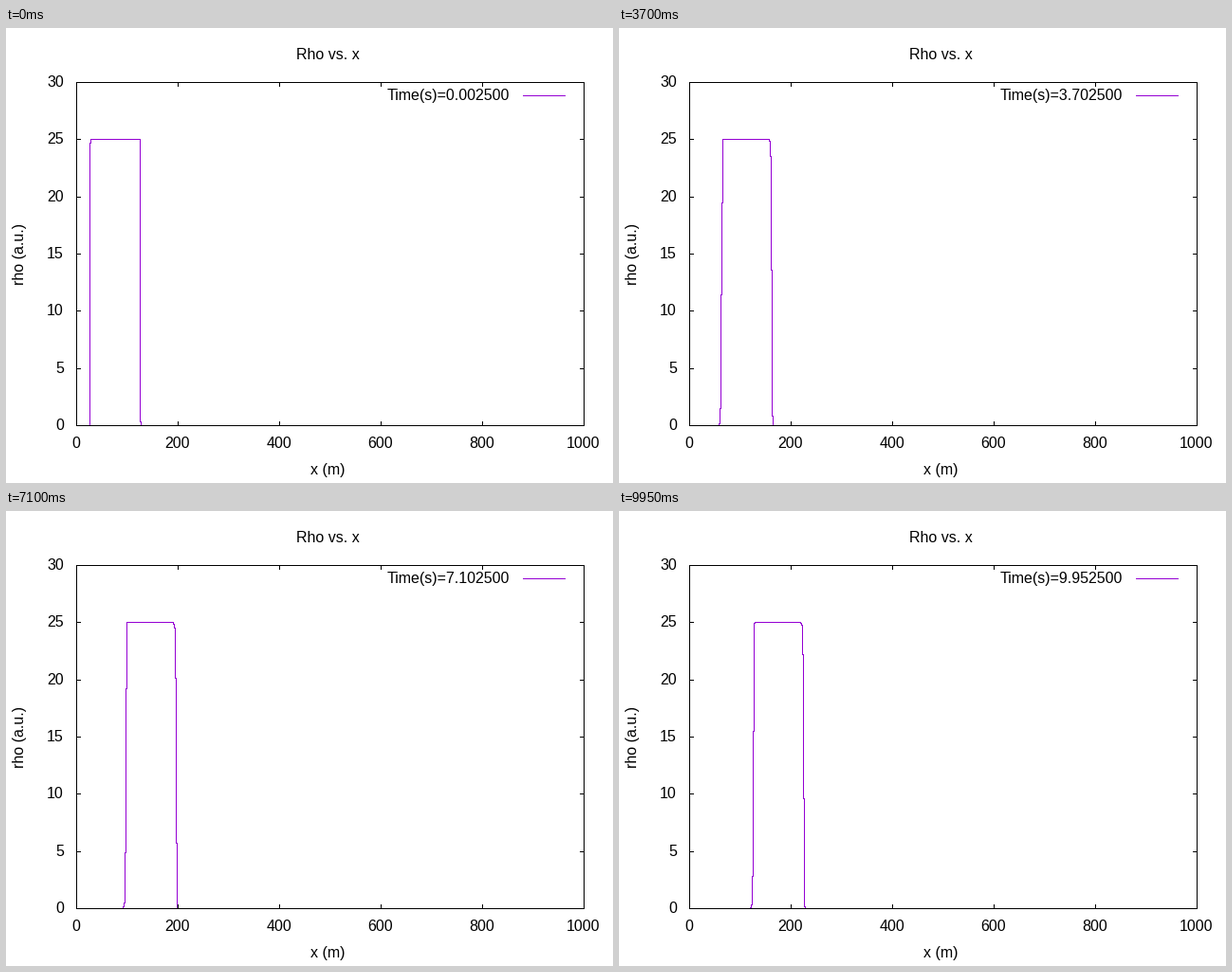
A matplotlib script that plays this animation: 640x480 px, repeating every 10000 ms.

```python
import numpy as np
import matplotlib.pyplot as plt
from matplotlib.animation import FuncAnimation
from matplotlib.collections import LineCollection

WIDTH, HEIGHT, DPI = 640, 480, 80
LEFT, RIGHT, TOP, BOTTOM = 74, 609, 57, 419
X_ORIGIN = LEFT - 0.26  # the x axis starts at a fractional pixel
X_MAX, Y_MAX = 1000, 30
PURPLE = "#9400d3"
FRAMES, INTERVAL = 200, 50
DT, SPEED, STEPS_PER_FRAME = 0.0025, 10, 20
COURANT = SPEED * DT  # cells are 1 m wide

plt.rcParams["font.family"] = "Liberation Sans"
plt.rcParams["font.size"] = 16 * 72 / DPI


def px(x):
    return np.floor(X_ORIGIN + np.asarray(x) * (RIGHT - LEFT) / X_MAX + 0.5)


def py(y):
    return np.floor(BOTTOM - np.asarray(y) * (BOTTOM - TOP) / Y_MAX + 0.5)


def superbee(a, b):
    p, q = np.abs(a), np.abs(b)
    size = np.maximum(np.minimum(2 * p, q), np.minimum(p, 2 * q))
    return np.where(a * b > 0, np.sign(a) * size, 0)


def advect(rho):
    """Advance the density by one step of flux-limited upwind advection."""
    d = np.diff(rho)
    flux = rho[1:-1] + 0.5 * (1 - COURANT) * superbee(d[:-1], d[1:])
    new = rho.copy()
    new[2:-1] -= COURANT * np.diff(flux)
    return new


def simulate():
    rho = np.where((grid > 26) & (grid < 126), 25.0, 0.0)
    rho = advect(rho)
    states = [rho]
    for _ in range(FRAMES - 1):
        for _ in range(STEPS_PER_FRAME):
            rho = advect(rho)
        states.append(rho)
    return states


def pixel_lines(color, zorder):
    lines = LineCollection([], colors=color, linewidths=72 / DPI,
                           antialiaseds=False, capstyle="projecting",
                           snap=False, zorder=zorder)
    ax.add_collection(lines, autolim=False)
    return lines


def set_lines(lines, segments):
    shape = np.array(segments, dtype=float).reshape(-1, 2, 2)
    lines.set_segments(list(shape + 0.5))  # pixel centres


def curve_segments(rho):
    """Turn the curve into upright and level runs of whole pixels."""
    runs = []
    ys = py(rho)
    for x0, y0, x1, y1 in zip(grid_px[:-1], ys[:-1], grid_px[1:], ys[1:]):
        if y0 == y1:
            if x0 != x1 and y0 < BOTTOM:
                runs.append([(x0, y0), (x1, y1)])
        elif x0 == x1:
            runs.append([(x0, y0), (x0, y1)])
        else:
            mid = (y0 + y1) // 2
            runs += [[(x0, y0), (x0, mid)], [(x1, mid), (x1, y1)]]
    return runs


def draw_axes():
    corners = [(LEFT, TOP), (RIGHT, TOP), (RIGHT, BOTTOM), (LEFT, BOTTOM)]
    segments = [[a, b] for a, b in zip(corners, corners[1:] + corners[:1])]
    for value in range(0, X_MAX + 1, 200):
        x = px(value)
        segments += [[(x, BOTTOM), (x, BOTTOM - 4)], [(x, TOP), (x, TOP + 4)]]
        ax.text(x, 443, str(value), ha="center")
    for value in range(0, Y_MAX + 1, 5):
        y = py(value)
        segments += [[(LEFT, y), (LEFT + 4, y)], [(RIGHT, y), (RIGHT - 4, y)]]
        ax.text(61, y + 5, str(value), ha="right")
    set_lines(pixel_lines("black", 5), segments)


fig = plt.figure(figsize=(WIDTH / DPI, HEIGHT / DPI), dpi=DPI, facecolor="white")
ax = fig.add_axes([0, 0, 1, 1])
ax.set_xlim(0, WIDTH)
ax.set_ylim(HEIGHT, 0)
ax.axis("off")

draw_axes()
ax.text(339, 33, "Rho vs. x", ha="center")
ax.text(339, 471, "x (m)", ha="center")
ax.text(19, 238.5, "rho (a.u.)", rotation=90, rotation_mode="anchor",
        ha="center", va="baseline")
clock = ax.text(531, 76, "", ha="right")
set_lines(pixel_lines(PURPLE, 3), [[(545, 71), (589, 71)]])

grid = np.arange(X_MAX + 1)
grid_px = px(grid)
states = simulate()
curve = pixel_lines(PURPLE, 2)


def update(i):
    set_lines(curve, curve_segments(states[i]))
    clock.set_text(f"Time(s)={DT + i * STEPS_PER_FRAME * DT:.6f}")
    return curve, clock


anim = FuncAnimation(fig, update, frames=FRAMES, interval=INTERVAL,
                     init_func=lambda: update(0), repeat=True)
plt.show()
```
